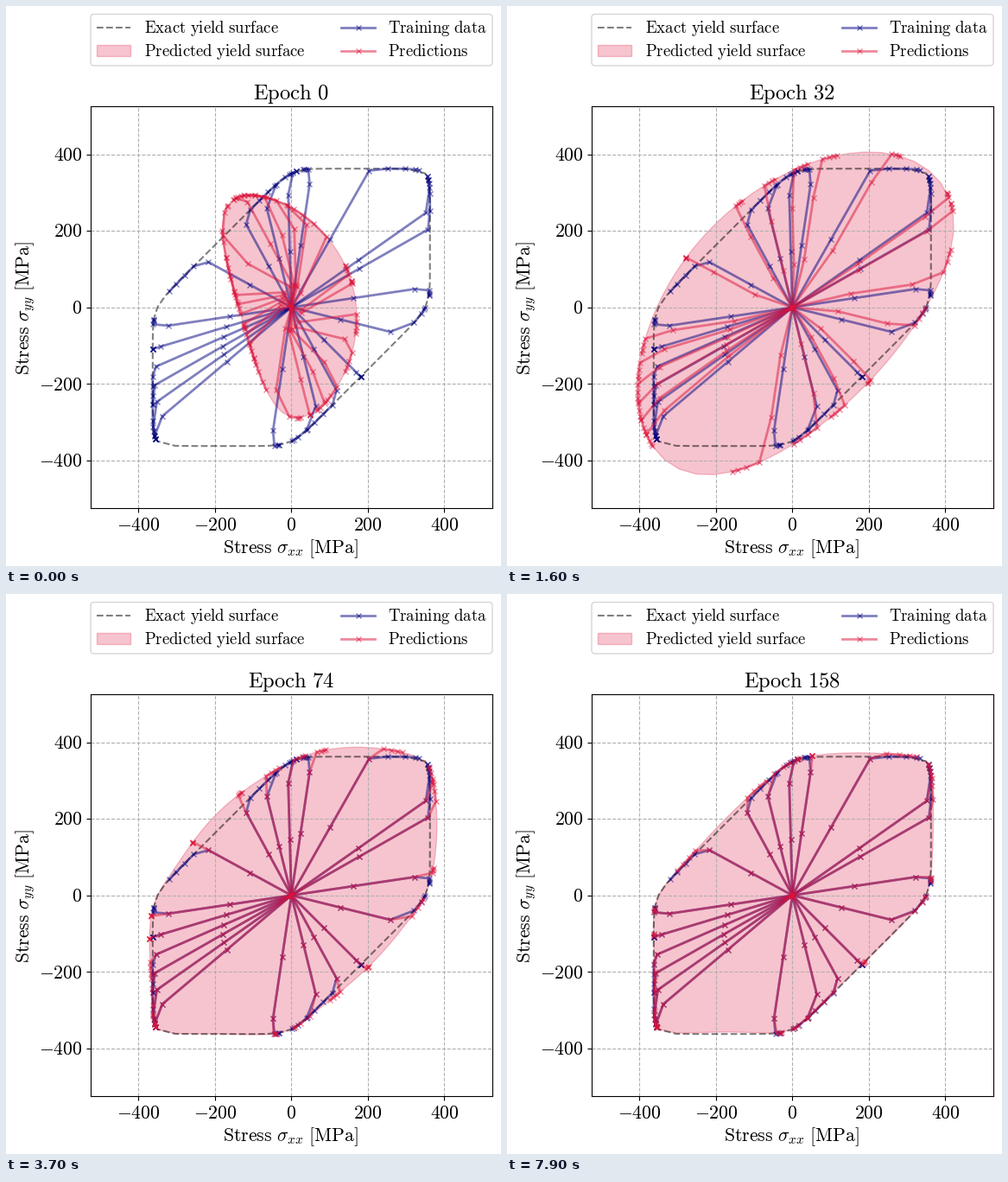
A matplotlib script for the animation above (8000 ms loop, 573x648 px).

```python
import numpy as np
import matplotlib.pyplot as plt
from matplotlib.animation import FuncAnimation
from matplotlib.patches import FancyBboxPatch, Rectangle

plt.rcParams["mathtext.fontset"] = "cm"

W, H, DPI = 573, 648, 100
FRAMES, INTERVAL = 80, 100
YIELD, POWER, NU = 350, 20, 0.3
STEPS = 6

# ---- yield surfaces as radius over polar angle, one value per degree ----
theta = np.radians(np.arange(360))
unit = np.column_stack([np.cos(theta), np.sin(theta)])


def hosford(n):
    c, s = unit.T
    return YIELD * (2 / (abs(c)**n + abs(s)**n + abs(c - s)**n)) ** (1 / n)


exact, mises = hosford(POWER), hosford(2)


def oval(cx, cy, a, b, bow, tilt):
    """Tilted ellipse whose long axis is bent sideways by bow."""
    t = np.linspace(0, 2 * np.pi, 720, endpoint=False)
    tilt = np.radians(tilt)
    u, v = a * np.cos(t), b * np.sin(t) + bow * np.sin(t)**2
    x = cx + u * np.cos(tilt) - v * np.sin(tilt)
    y = cy + u * np.sin(tilt) + v * np.cos(tilt)
    return np.interp(theta, np.arctan2(y, x), np.hypot(x, y), period=2 * np.pi)


def rounded(mean, shear, lift):
    """Exact surface, swollen towards von Mises by an angle-dependent share."""
    share = mean - shear * np.sin(2 * theta) + lift * np.sin(theta)
    return exact + share * (mises - exact)


start = oval(-50, 2, 300, 151, -66, 106)
overshoot = oval(31, -43, 549, 300, 68, 45)
settling = oval(-2, 0, 480, 275, 0, 47.5)

key_epochs = np.array([0, 18, 22, 42, 74, 128, 158])
key_radii = np.array([start, overshoot, overshoot, settling,
                      rounded(0.54, 0.31, 0.33),
                      rounded(0.35, 0.21, 0.29),
                      rounded(0.10, 0.05, 0.20)])

# Error of the predicted first elastic step, as a map on the strain direction
key_errors = np.zeros((len(key_epochs), 2, 2))
key_errors[0] = [[-150, -32], [-83, -121]]
key_errors[1:3] = [[-2, 17], [18, -74]]
key_errors[3] = [[-14, -5], [-5, 5]]


def at_epoch(keys, epoch):
    i = min(np.searchsorted(key_epochs, epoch, side="right") - 1, len(keys) - 2)
    w = (epoch - key_epochs[i]) / (key_epochs[i + 1] - key_epochs[i])
    return (1 - w) * keys[i] + w * keys[i + 1]


# ---- elastic-plastic load paths, strain directions on a 9 degree raster ----
angles = np.radians(9 * np.array([-1, 2, 3, 8, 11, 12, 13, 14, 16, 19,
                                  20, 21, 22, 23, 24, 31, 33, 34, 35, 37]))
strain = np.column_stack([np.cos(angles), np.sin(angles)])
stress_step = 155.7 / (1 - NU**2) * strain @ np.array([[1, NU], [NU, 1]])

# Energy norm of the compliance turns the return mapping into a nearest point
metric = np.linalg.cholesky(np.array([[1, -NU], [-NU, 1]]))


def project(p, poly):
    a, edge = poly, np.roll(poly, -1, axis=0) - poly
    i = (np.degrees(np.arctan2(p[:, 1], p[:, 0])) % 360).astype(int) % 360
    rel = p - a[i]
    outside = edge[i, 0] * rel[:, 1] - edge[i, 1] * rel[:, 0] < 0

    am, em, pm = a @ metric, edge @ metric, p @ metric
    t = ((pm[:, None] - am) * em).sum(-1) / (em**2).sum(-1)
    t = np.clip(t, 0, 1)[..., None]
    dist = ((am + t * em - pm[:, None]) ** 2).sum(-1)
    j = dist.argmin(1)
    nearest = a[j] + t[np.arange(len(p)), j] * edge[j]
    return np.where(outside[:, None], nearest, p)


def load_paths(radius, error=np.zeros((2, 2))):
    poly = radius[:, None] * unit
    s = project(stress_step + strain @ error.T, poly)
    points = [np.zeros_like(s), s]
    for _ in range(STEPS - 1):
        s = project(s + stress_step, poly)
        points.append(s)
    return np.stack(points, axis=1)


def outline(radius):
    return (radius[:, None] * unit)[::5]


# ---- figure ----
fig = plt.figure(figsize=(W / DPI, H / DPI), dpi=DPI, facecolor="white")
ax = fig.add_axes([97.8 / W, 66.8 / H, 465 / W, 465 / H])
ax.set(xlim=(-525, 525), ylim=(-525, 525))
ticks = range(-400, 401, 200)
ax.set_xticks(ticks)
ax.set_yticks(ticks)
ax.tick_params(labelbottom=False, labelleft=False)
ax.grid(ls="--")

page = fig.add_axes([0, 0, 1, 1])
page.set(xlim=(0, W), ylim=(H, 0))
page.axis("off")

DASHED = dict(color="black", alpha=0.5, ls="--", lw=1.5)
FILL = dict(color="crimson", alpha=0.25, lw=1)


def path_style(color):
    return dict(color=color, alpha=0.5, lw=2, marker="x", ms=4)


def rm(text):
    return r"$\mathrm{%s}$" % text.replace(" ", r"\ ")


def label(x, y, text, size, ha="center", **kw):
    return page.text(x, y, text, fontsize=size, ha=ha, va="baseline", **kw)


for v in ticks:
    shift = v * 465 / 1050
    label(330.5 + shift, 607, f"${v}$", 15.7)
    label(88.5, 356 - shift, f"${v}$", 15.7, "right")

axis_text = r"$\mathrm{Stress}\ \sigma_{%s}\ \mathrm{[MPa]}$"
label(330, 633, axis_text % "xx", 15.7)
label(27, 350, axis_text % "yy", 15.7, rotation=90, rotation_mode="anchor")
title = label(330, 108, "", 17.7)

# Legend
page.add_patch(FancyBboxPatch((98, 9.5), 465, 59.5, fc="white", ec="0.8", alpha=0.8,
                              boxstyle="round,pad=0,rounding_size=3.9"))
page.plot([105, 144], [24.5, 24.5], **DASHED)
page.add_patch(Rectangle((105, 44.5), 39, 13.5, **FILL))
for y, color in ((24.5, "navy"), (51.5, "crimson")):
    page.plot([388, 427], [y, y], color=color, alpha=0.5, lw=2)
    page.plot([407.5], [y], **path_style(color))
for x, y, text in ((160, 31, "Exact yield surface"),
                   (160, 58, "Predicted yield surface"),
                   (442, 31, "Training data"),
                   (442, 58, "Predictions")):
    label(x, y, rm(text), 13.5, "left")

# Curves
surface, = ax.fill(*outline(start).T, **FILL)
ring = outline(exact)
ax.plot(*np.vstack([ring, ring[:1]]).T, **DASHED)
for p in load_paths(exact):
    ax.plot(*p.T, **path_style("navy"))
predicted = [ax.plot([], [], **path_style("crimson"))[0] for _ in angles]


def draw(i):
    epoch = 2 * i
    radius = at_epoch(key_radii, epoch)
    surface.set_xy(outline(radius))
    for line, p in zip(predicted, load_paths(radius, at_epoch(key_errors, epoch))):
        line.set_data(*p.T)
    title.set_text(rm(f"Epoch {epoch}"))
    return [surface, title, *predicted]


anim = FuncAnimation(fig, draw, frames=FRAMES, interval=INTERVAL,
                     repeat=True, repeat_delay=0, blit=False)
plt.show()
```
